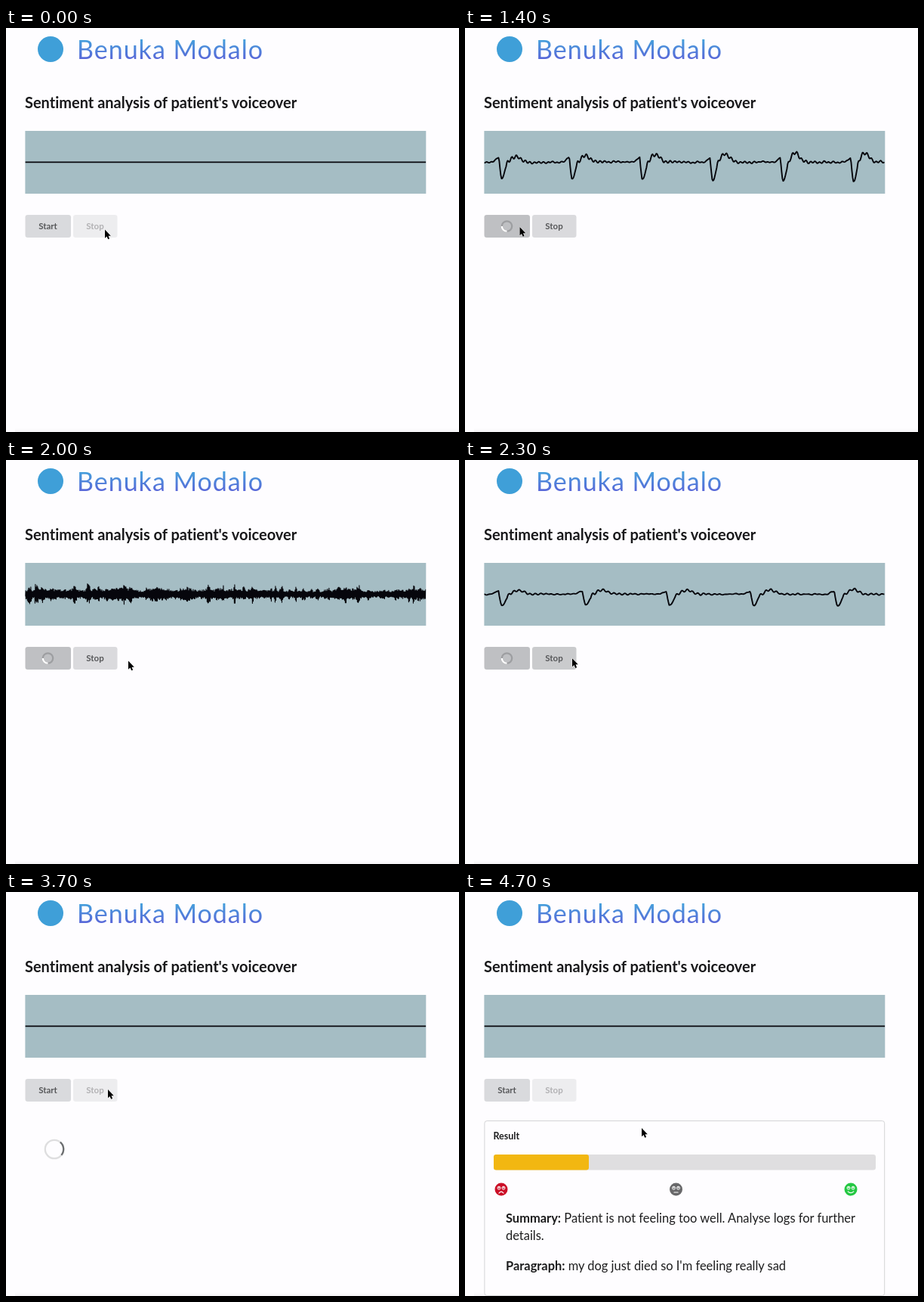
Recreate the animation shown at these times as an HTML page. Size 600 px wide and 534 px high, loop 5000 ms.

```html
<!DOCTYPE html>
<html lang="en">
<head>
<meta charset="utf-8">
<title>Sentiment analysis</title>
<style>
  html, body { margin: 0; width: 100%; height: 100%; overflow: hidden; background: #fefdff; }
  svg { display: block; width: 600px; height: 534px; font-family: Lato, Carlito, sans-serif; font-variant-ligatures: none; }
  .b { font-weight: 700; }
  .body { font-size: 16.45px; fill: #1d1d1e; }
  .label { font-size: 11.5px; font-weight: 700; fill: #57585a; text-anchor: middle; }
  .line { fill: none; stroke: #06060c; stroke-linejoin: round; }
  .ring { fill: none; stroke-width: 2.3; }
  .mouth { fill: none; stroke: #fff; stroke-width: 1.2; stroke-linecap: round; }
</style>
</head>
<body>
<svg viewBox="0 0 600 534">
  <defs>
    <linearGradient id="ink" gradientUnits="userSpaceOnUse" x1="0" y1="14" x2="0" y2="44">
      <stop stop-color="#45a4dc"/><stop offset="1" stop-color="#5a60d8"/>
    </linearGradient>
    <linearGradient id="fade" x1="0" y1="0" x2="0" y2="1">
      <stop stop-color="#f4f3f5" stop-opacity="0"/><stop offset="1" stop-color="#f4f3f5"/>
    </linearGradient>
    <clipPath id="panel"><rect x="25.4" y="136" width="530.9" height="83"/></clipPath>
    <g id="eyes">
      <g fill="none" stroke="#fff"><circle cx="-3" cy="-1.8" r="2"/><circle cx="3" cy="-1.8" r="2"/></g>
      <g fill="#fff"><circle cx="-3" cy="-2.3" r=".9"/><circle cx="3" cy="-2.3" r=".9"/></g>
    </g>
  </defs>
  <rect width="600" height="534" fill="#fefdff"/>
  <rect x="12" y="529" width="588" height="5" fill="url(#fade)"/>

  <circle cx="59" cy="28" r="17" fill="#3f9fd8"/>
  <text x="94" y="41" font-size="34" letter-spacing="1" fill="url(#ink)">Benuka Modalo</text>
  <text class="b" x="25" y="106" font-size="20" fill="#19191b">Sentiment analysis of patient's voiceover</text>

  <rect x="25.4" y="136" width="530.9" height="83" fill="#a5bdc4"/>
  <path id="wave" class="line" clip-path="url(#panel)"/>

  <rect id="start" x="25.5" y="247" width="60.5" height="30" rx="3.3"/>
  <text id="startText" class="label" x="55.5" y="266">Start</text>
  <g id="busy" class="ring" transform="translate(55.5 262)">
    <circle r="6.7" stroke="#9d9ea1"/>
    <path id="busyArc" d="M-4.74-4.74A6.7 6.7 0 0 1 4.74-4.74" stroke="#fff"/>
  </g>
  <g id="stop">
    <rect id="stopBox" x="89" y="247" width="58.5" height="30" rx="3.3"/>
    <text class="label" x="118" y="266">Stop</text>
  </g>

  <g id="loader" class="ring" transform="translate(64 340)">
    <circle r="12.2" stroke="#dededf"/>
    <path id="loaderArc" d="M-8.63-8.63A12.2 12.2 0 0 1 8.63-8.63" stroke="#6c6e70"/>
  </g>

  <g id="result">
    <rect x="25.9" y="302.5" width="529.8" height="231" rx="3.3" fill="#fefdff" stroke="#d4d4d6"/>
    <text class="b" x="37.5" y="326.5" font-size="12.5" fill="#1d1d1e">Result</text>
    <rect x="38" y="347" width="506" height="20.5" rx="3.3" fill="#dfdee0"/>
    <rect x="38" y="347" width="126" height="20.5" rx="3.3" fill="#f2b711"/>
    <g transform="translate(48 393)">
      <circle r="8.5" fill="#cb0f27"/><use href="#eyes"/><path class="mouth" d="M-3 5Q0 1.2 3 5"/>
    </g>
    <g transform="translate(279.5 393)">
      <circle r="8.5" fill="#68686a"/><use href="#eyes"/><path class="mouth" d="M-2.6 4H2.6"/>
    </g>
    <g transform="translate(511 393)">
      <circle r="8.5" fill="#25c843"/><use href="#eyes"/><path class="mouth" d="M-3.8 2.8Q0 6.6 3.8 2.8"/>
    </g>
    <g class="body">
      <text x="54" y="437"><tspan class="b">Summary:</tspan> Patient is not feeling too well. Analyse logs for further</text>
      <text x="54" y="460">details.</text>
      <text x="54" y="500"><tspan class="b">Paragraph:</tspan> my dog just died so I'm feeling really sad</text>
    </g>
  </g>

  <path id="cursor" d="M0 0V11.2L2.5 8.9 4.2 12.8 6.1 12 4.5 8.2H7.8Z" stroke="#fff" stroke-width=".9" paint-order="stroke"/>
</svg>
<script>
const $ = id => document.getElementById(id);
const LEFT = 25.4, RIGHT = 556.3, MID = 177.4;
const CLICK_START = 7, CLICK_STOP = 25, DONE = 38;

// Cursor moves: first tick, last tick, target x, y
const moves = [[0, 4, 72.5, 263], [17, 20, 162, 265.5], [21, 24, 135, 261], [37, 42, 234, 312]];

const clamp = v => Math.max(0, Math.min(1, v));
const smooth = v => v * v * (3 - 2 * v);
const bell = v => Math.exp(-v * v);
const hash = n => { const v = Math.sin(n * 12.9898) * 43758.5453; return v - Math.floor(v); };

function noise(x) {
  const i = Math.floor(x), a = hash(i), b = hash(i + 1);
  return a + (b - a) * smooth(x - i);
}

function cursorAt(tick) {
  let x = 131, y = 266.5;
  for (const [from, to, tx, ty] of moves) {
    const p = smooth(clamp((tick - from) / (to - from)));
    x += (tx - x) * p;
    y += (ty - y) * p;
  }
  return `${x} ${y}`;
}

const signals = {
  // A faint ripple that swells to the right
  hush(x, tick) {
    const swell = clamp((x - 320) / 170) ** 2;
    return noise(x / 25 + tick) - .5 + swell * 1.8 * Math.sin(x * .68 + tick);
  },
  // Repeating pulses: sharp dip, rebound, fading ripple
  voiced(x, tick) {
    const shift = tick - 14;
    const u = (x - 45 - shift * 37) / (93.2 + shift * 2), n = Math.floor(u), d = (u - n) * 93;
    const late = Math.max(0, n);
    const lead = 6 * bell((d - 93) / 5) + 6 * Math.exp(-d);
    const dip = 22 * (1 + late * .03) * clamp(d / 3) * bell(Math.max(0, d - 4) / 5);
    const rebound = 8 * (1 + late * .12) * bell((d - 22 + late * .7) / 8);
    const ring = d > 9 ? 3.5 * Math.exp(-d / 40) * Math.cos(1.05 * (d - 17 + late * .3)) : 0;
    return dip - lead - rebound - ring + (noise(x / 4 + tick) - .5) * 2;
  },
  // Packed samples in bursts, a little calmer to the right
  dense(x, tick) {
    const at = x + (tick - 20) * 61;
    const size = 4.5 + 5 * noise(at / 15) ** 2 + 10 * noise(at / 3) ** 4;
    const sign = Math.round(x * 2) % 2 ? 1 : -1;
    return sign * size * (1.15 - x / 1400) * (.5 + .5 * hash(x + tick));
  }
};

function speech(tick) {
  const k = tick - CLICK_START;
  const kind = k < 3 || k > 16 ? "hush" : k > 10 && k < 15 ? "dense" : "voiced";
  const gain = Math.min(1, (k + 1) / 3, (18 - k) / 3) * (1 + .8 * bell(k - 4));
  return { kind, gain };
}

function wavePath(tick, { kind, gain }) {
  let d = "";
  for (let x = LEFT; x <= RIGHT; x += kind === "dense" ? .5 : 1)
    d += (d ? "L" : "M") + x.toFixed(1) + " " + (MID + gain * signals[kind](x, tick)).toFixed(2);
  return d;
}

const set = (id, name, value) => $(id).setAttribute(name, value);
const show = (id, on) => set(id, "visibility", on ? "visible" : "hidden");

function draw(tick) {
  const recording = tick >= CLICK_START && tick < CLICK_STOP;
  const voice = speech(tick);
  set("wave", "d", recording ? wavePath(tick, voice) : `M${LEFT} ${MID}H${RIGHT}`);
  set("wave", "stroke-width", recording && voice.kind === "dense" ? 1.1 : 1.9);

  set("start", "fill", recording ? "#bfc0c3" : tick >= 4 && tick < CLICK_START ? "#cacbcd" : "#d9dadd");
  show("startText", !recording);
  show("busy", recording);
  set("busyArc", "transform", `rotate(${225 + (tick - 20) * 120})`);
  set("stop", "opacity", recording ? 1 : .45);
  set("stopBox", "fill", recording && tick >= 23 ? "#cacbcd" : "#dadadd");

  show("loader", tick >= CLICK_STOP && tick < DONE);
  set("loaderArc", "transform", `rotate(${325 + (tick - 27) * 120})`);
  show("result", tick >= DONE);
  set("cursor", "transform", `translate(${cursorAt(tick)})`);
}

let last = -1;
function loop() {
  const tick = Math.floor(performance.now() % 5000 / 100);
  if (tick !== last) draw(last = tick);
  requestAnimationFrame(loop);
}
loop();
</script>
</body>
</html>
```
